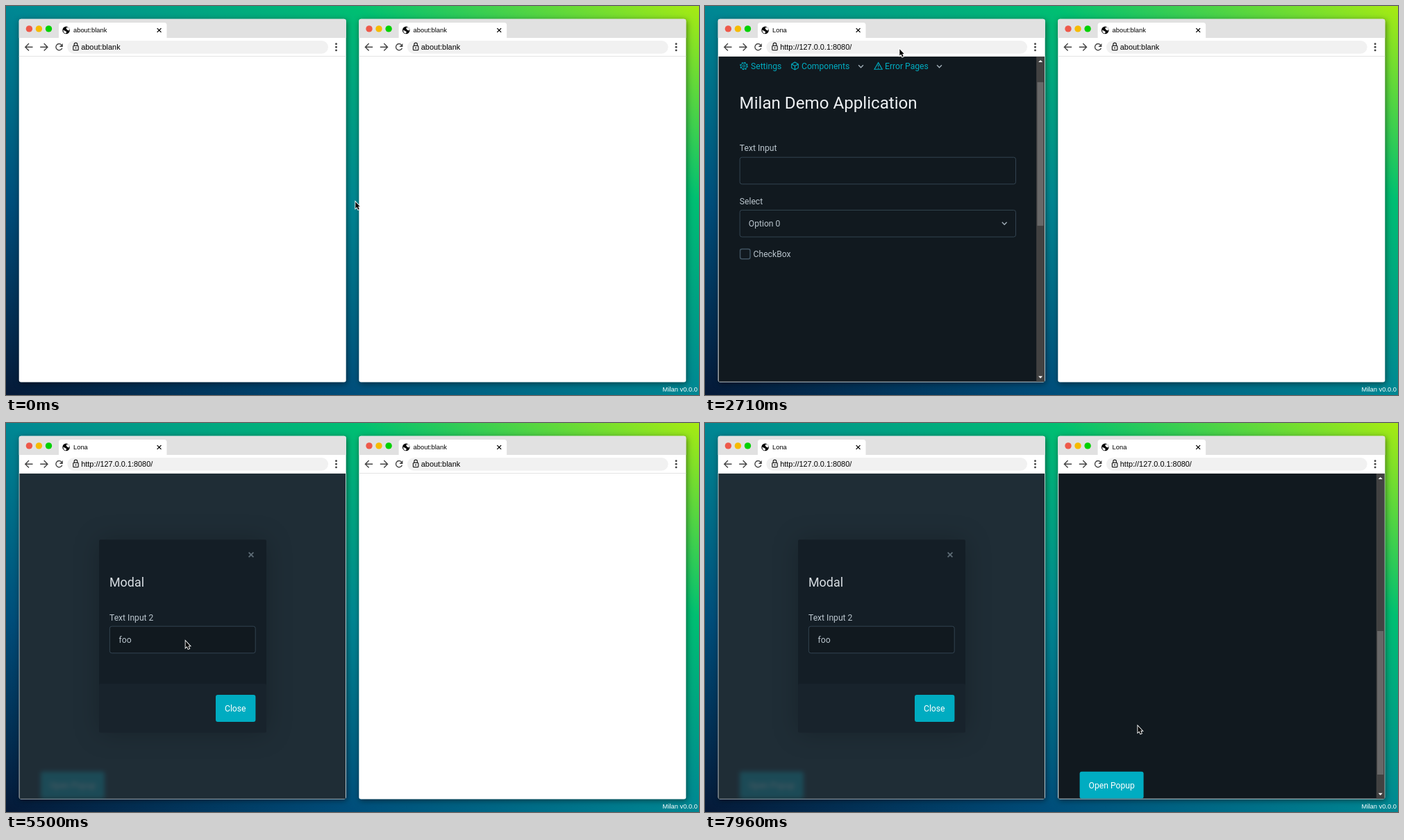
Recreate the animation shown at these times as an HTML page. Size 998 px wide and 561 px high, loop 8000 ms.

```html
<!DOCTYPE html>
<html lang="en">
<head>
<meta charset="utf-8">
<title>Browser demo</title>
<style>
  html, body { margin: 0; width: 100%; height: 100%; overflow: hidden; }
  svg {
    display: block; width: 998px; height: 561px;
    background: linear-gradient(to right top, #051937, #004d7a, #008793, #00bf72, #a8eb12);
  }
  text { font: 12.15px Roboto, sans-serif; fill: #bbc6ce; white-space: pre; }
  .tab { font: 9.36px "Liberation Sans", Arial, sans-serif; fill: #000; }
  .url { font: 10.92px "Liberation Sans", Arial, sans-serif; fill: #000; }
  .frame { filter: drop-shadow(1px 2px 4px rgba(0, 0, 0, .5)); }
  .card { filter: drop-shadow(0 1px 18px rgba(0, 0, 0, .22)); }
</style>
</head>
<body>
<svg id="stage" viewBox="0 0 998 561"></svg>
<script>
const LOOP = 8000, SECOND_X = 489.6, SCROLL_END = 484;
const CYAN = '#00acc1', BORDER = '#374956', PAGE = '#11191f';

const rect = (x, y, w, h, fill, r = 0, extra = '') =>
  `<rect x="${x}" y="${y}" width="${w}" height="${h}" rx="${r}" fill="${fill}" ${extra}/>`;
const circle = (x, y, r, fill, extra = '') =>
  `<circle cx="${x}" cy="${y}" r="${r}" fill="${fill}" ${extra}/>`;
const line = (d, color, width = 1.1) =>
  `<path d="${d}" fill="none" stroke="${color}" stroke-width="${width}"/>`;
const text = (x, y, value, style = '', extra = '') =>
  `<text x="${x}" y="${y}" style="${style}" ${extra}>${value}</text>`;
const field = (x, y, w) => rect(x, y, w, 38.6, PAGE, 3, `stroke="${BORDER}" stroke-width=".9"`);
const button = (x, y, w, label) =>
  rect(x, y, w, 39, CYAN, 3) + text(x + 13, y + 23.7, label, 'fill:#fff');
const chevron = (x, y) => line(`M${x - 3.4} ${y - 1.7}l3.4 3.4 3.4-3.4`, '#a2afb9', 1.4);
const cross = (x, y, r, color, width) =>
  line(`M${x - r} ${y - r}l${2 * r} ${2 * r}m0 ${-2 * r}l${-2 * r} ${2 * r}`, color, width);

function navigation() {
  const link = `fill:${CYAN}`;
  return rect(49, 92, 15, 15, '#f4f1ea') + text(71.8, 104.2, 'Lona')
    + circle(56, 140.5, 4.2, 'none', `stroke="${CYAN}"`)
    + circle(56, 140.5, 5.1, 'none', `stroke="${CYAN}" stroke-width="1.4" stroke-dasharray="2 2.005"`)
    + circle(56, 140.5, 1.7, 'none', `stroke="${CYAN}"`)
    + text(66, 144.6, 'Settings', link)
    + line('M129.5 135l4.8 2.7v5.5l-4.8 2.7-4.8-2.7v-5.5zM124.7 137.7l4.8 2.8 4.8-2.8M129.5 140.5v5.4', CYAN)
    + text(139, 144.6, 'Components', link) + chevron(224.5, 141)
    + line('M249.6 135.6l5.6 9.6h-11.2zM249.6 138.8v3M249.6 143v1.2', CYAN)
    + text(259, 144.6, 'Error Pages', link) + chevron(337.5, 141);
}

function demoPage(id) {
  return `<g id="${id}-content">${navigation()}`
    + text(49.6, 202.2, 'Milan Demo Application', 'font-size:24.15px;fill:#edf0f3')
    + text(49.8, 263.4, 'Text Input') + field(50.2, 272.2, 397.3)
    + text(49.8, 339.6, 'Select') + field(50.2, 348.4, 397.3)
    + text(62.8, 371.7, 'Option 0') + chevron(431.2, 367.5)
    + rect(50.6, 404.6, 14.4, 14.2, PAGE, 2.5, 'stroke="#415462" stroke-width="1.5"')
    + text(69.6, 416.2, 'CheckBox') + button(50, 986.8, 92, 'Open Popup')
    + `</g><g id="${id}-bar">` + rect(477.2, 73, 12, 469, '#424242')
    + rect(478.5, 86, 9, 207, '#686868', 0, `id="${id}-thumb"`)
    + '<path d="M480.1 81l3-3.1 3 3.1zM480.1 533.8l3 3.1 3-3.1z" fill="#fff"/></g>';
}

function modal() {
  return rect(19, 73, 471, 470, '#24333d', 0, 'id="overlay"') + '<g id="modal">'
    + rect(134, 168.3, 241, 278, '#141e26', 2, 'class="card"')
    + rect(134, 376, 241, 70.3, '#18232c', 2)
    + cross(353, 190, 3.4, '#5d6b75', 1.8)
    + text(149, 235.8, 'Modal', 'font-size:17.9px;fill:#d9dfe4')
    + text(149, 284.8, 'Text Input 2') + field(149.4, 293.2, 209.8)
    + text(162.5, 316.6, 'foo', '', 'id="foo"')
    + button(302, 392, 57.4, 'Close') + '</g>';
}

function browser(id, x, overlay = '') {
  const ink = '#444';
  return `<g transform="translate(${x})">`
    + rect(18.7, 18.7, 471, 523.8, '#fff', 3, 'class="frame"')
    + '<path d="M18.7 46V21.7a3 3 0 0 1 3-3h465a3 3 0 0 1 3 3V46z" fill="#e1e1e1"/>'
    + '<path d="M76 46V27.5a3.5 3.5 0 0 1 3.5-3.5h148.5a3.5 3.5 0 0 1 3.5 3.5V46z" fill="#fff"/>'
    + circle(33.4, 32.9, 4.7, '#ee594a') + circle(47.4, 32.9, 4.7, '#f6bb00') + circle(61.5, 32.9, 4.7, '#00d100')
    + circle(86.6, 34.9, 5.3, '#000')
    + '<path d="M87 31l3-.6 1.6 3.2-1 1.8-2.2-.6-1.6-2zM82.2 34.5l2.6 1.2 1.9 1 .5 1.6-1.6 1.5-2.4-1.5z" fill="#fff"/>'
    + text(97, 38.2, 'about:blank', '', `id="${id}-title" class="tab"`)
    + cross(220.6, 35, 2.9, '#000', 1.3)
    + line('M38.5 59.3H28M33 54.1l-5.2 5.2 5.2 5.2', ink, 1.4)
    + line('M49.2 59.3h10.5M54.7 54.1l5.2 5.2-5.2 5.2', ink, 1.4)
    + line('M79.8 55.9A4.6 4.6 0 1 0 80.8 60.8', ink, 1.4)
    + `<path d="M81.8 53.9v5h-5z" fill="${ink}"/>`
    + rect(88.3, 50, 375.7, 18.7, '#f1f1f1', 9.35)
    + rect(96.8, 57.3, 7.4, 6.4, 'none', 1, 'stroke="#222" stroke-width="1.2"')
    + line('M98.2 57v-1.6a2.3 2.3 0 0 1 4.6 0V57', '#222', 1.2) + circle(100.5, 60.5, 1, '#222')
    + text(108.2, 63, 'about:blank', '', `id="${id}-url" class="url"`)
    + [54.7, 59.3, 63.9].map(y => circle(475.5, y, 1.45, ink)).join('')
    + rect(18.7, 72.2, 471, .8, '#dedede')
    + `<g id="${id}-page" clip-path="url(#view)">` + rect(19, 73, 471, 470, PAGE)
    + demoPage(id) + overlay + '</g></g>';
}

const stage = document.getElementById('stage');
stage.innerHTML = '<clipPath id="view"><rect x="19.6" y="73" width="469.3" height="468.7"/></clipPath>'
  + browser('left', 0, modal()) + browser('right', SECOND_X)
  + text(996, 556.2, 'Milan v0.0.0', 'fill:#fff;text-anchor:end', 'class="tab"')
  + '<path id="cursor" d="M0 0V9.3L2.1 7.4 3.8 11.3 5.4 10.6 3.8 6.8H6.4z" stroke="#fff" stroke-width="1.8" paint-order="stroke"/>';

const parts = {};
for (const node of stage.querySelectorAll('[id]')) parts[node.id] = node;

const clamp = v => Math.min(1, Math.max(0, v));
const bezier = (x1, y1, x2, y2) => x => {
  const at = (a, b, s) => 3 * a * s * (1 - s) ** 2 + 3 * b * s * s * (1 - s) + s ** 3;
  let low = 0, high = 1;
  for (let i = 0; i < 24; i++) {
    const mid = (low + high) / 2;
    if (at(x1, x2, mid) < x) low = mid; else high = mid;
  }
  return at(y1, y2, high);
};
const ease = bezier(.25, .1, .25, 1), easeInOut = bezier(.42, 0, .58, 1);
const progress = (t, start, duration, curve) => {
  const p = clamp((t - start) / duration);
  return p === 0 || p === 1 ? p : curve(p);
};

const START = [503.3, 282.5];
const MOVES = [  // start, duration, x, y
  [980, 300, 280.3, 62.2],
  [3085, 300, 99.8, 523.7],
  [4430, 260, 258.6, 314.6],
  [5680, 300, 770.2, 62.2],
  [7808, 300, 589.4, 523.7],
];
const CLICKS = [1500, 3590, 4920, 6210], CLICK_TIME = 250;

const TABS = [
  { id: 'left', typed: 2080, opened: 2330, dark: 2370, loaded: 2415, scroll: 2595, titled: 2665 },
  { id: 'right', typed: 6750, opened: 7000, dark: 7000, loaded: 7000, scroll: 7332, titled: 7415 },
];
const MODAL_START = 4035, ARTICLE_START = 4080, FOO_TIME = 5500;

const show = (node, on) => node.style.display = on ? '' : 'none';

function drawTab(tab, t) {
  const part = name => parts[`${tab.id}-${name}`];
  const scroll = Math.round(SCROLL_END * progress(t, tab.scroll, 500, easeInOut));
  part('title').textContent = t < tab.opened ? 'about:blank' : t < tab.titled ? '' : 'Lona';
  part('url').textContent = t < tab.typed ? 'about:blank' : 'http://127.0.0.1:8080' + (t < tab.opened ? '' : '/');
  show(part('page'), t >= tab.dark);
  show(part('content'), t >= tab.loaded);
  show(part('bar'), t >= tab.loaded && (tab.id === 'right' || t < MODAL_START));
  part('content').setAttribute('transform', `translate(0 ${-scroll})`);
  part('thumb').setAttribute('y', 86 + scroll * 214 / SCROLL_END);
}

function drawModal(t) {
  const dim = progress(t, MODAL_START, 385, p => p ** 3);
  const enter = progress(t, ARTICLE_START, 365, ease);
  parts['left-content'].style.filter = dim ? `blur(${dim * 3.1}px)` : 'none';
  parts.overlay.setAttribute('opacity', dim * .8);
  parts.modal.setAttribute('opacity', enter);
  parts.modal.setAttribute('transform', `translate(0 ${(enter - 1) * 278})`);
  show(parts.modal, enter > 0);
  show(parts.foo, t >= FOO_TIME);
}

function drawCursor(t) {
  let [x, y] = START;
  for (const [start, duration, toX, toY] of MOVES) {
    const p = progress(t, start, duration, ease);
    x += (toX - x) * p;
    y += (toY - y) * p;
  }
  const press = Math.max(...CLICKS.map(start => Math.sin(Math.PI * clamp((t - start) / CLICK_TIME))));
  parts.cursor.setAttribute('transform',
    `translate(${x} ${y}) translate(8 9) scale(${1 + .3 * press}) translate(-8 -9)`);
}

function draw() {
  const t = performance.now() % LOOP;
  TABS.forEach(tab => drawTab(tab, t));
  drawModal(t);
  drawCursor(t);
  requestAnimationFrame(draw);
}
draw();
</script>
</body>
</html>
```
